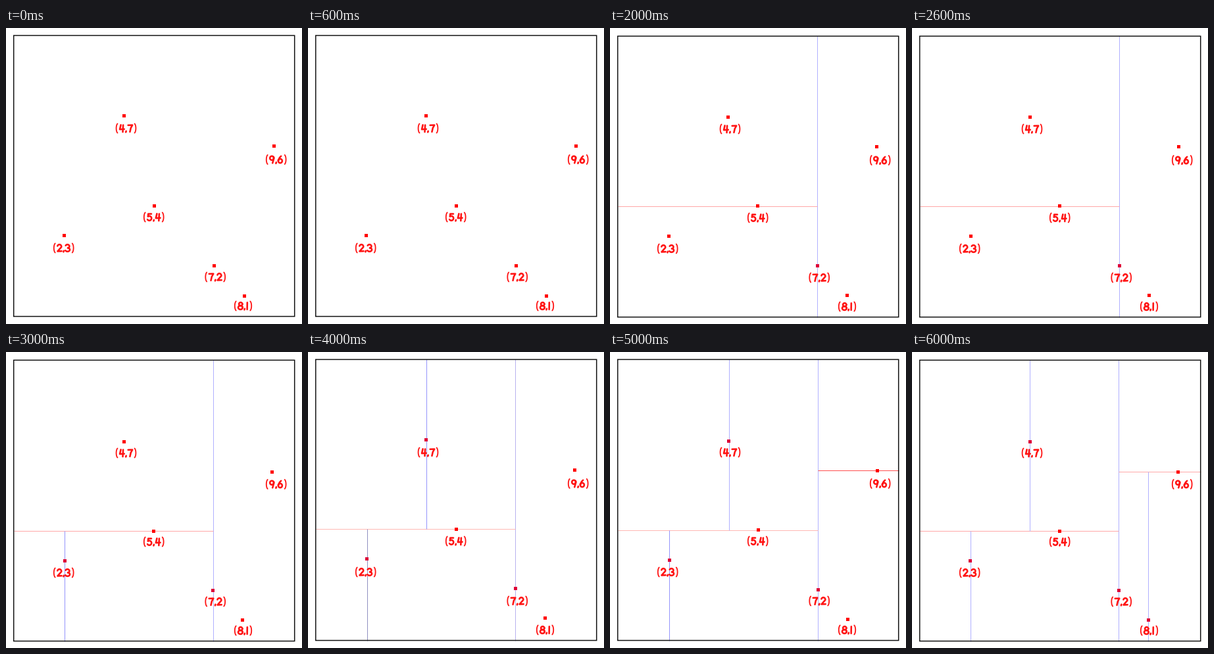
A matplotlib script that plays this animation: 450 px wide and 450 px high, repeating every 7 s.

```python
import numpy as np
import matplotlib.pyplot as plt
from matplotlib.animation import FuncAnimation
from matplotlib.patches import Rectangle

SIZE, DPI = 450, 100
PX = 72 / DPI
INK = "#ff1414"
BLUE, LILAC, DEEP_BLUE, SLATE = "#b0b0ff", "#b8b2ee", "#9494fc", "#9090c0"
PINK, PALE_PINK, RED = "#ffa8a8", "#ffb8b4", "#ff5050"

fig = plt.figure(figsize=(SIZE / DPI, SIZE / DPI), dpi=DPI, facecolor="white")
ax = fig.add_axes([0, 0, 1, 1])


def arc(cx, cy, rx, ry, start, end):
    """Points on an ellipse; angles in degrees, clockwise on screen."""
    t = np.radians(np.linspace(start, end, 24))
    return list(zip(cx + rx * np.cos(t), cy + ry * np.sin(t)))


# Handwritten strokes, y pointing down, centred on the text's middle line.
GLYPHS = {
    "(": [arc(3.6, 0, 2.8, 7.4, 252, 108)],
    ")": [arc(0.8, 0, 2.8, 7.4, -72, 72)],
    ",": [[(1.5, 4.2), (1, 5.9)]],
    "1": [[(2.2, -5.2), (2, 5.4)]],
    "2": [arc(4.2, -2.2, 3, 3.1, 195, 375) + [(1.4, 5), (7.6, 4.7)]],
    "3": [arc(3.8, -2.6, 3, 2.7, 205, 440) + arc(3.9, 2.5, 3.5, 2.8, -80, 155)],
    "4": [[(2.8, -5.2), (1.2, 1.6), (8, 1.2)], [(6.3, -5), (5.7, 5.6)]],
    "5": [[(7, -4.9), (2.2, -4.9), (1.8, -0.8)] + arc(3.9, 1.8, 3.3, 3.4, 235, 510)],
    "6": [[(5.6, -5.2), (3.4, -3), (1.4, 1)] + arc(4.3, 2.1, 3, 3.1, 190, 550)],
    "7": [[(1.2, -4.7), (7.8, -4.9), (5.4, -0.6), (4, 5.4)]],
    "8": [arc(4.7, -2.8, 2.6, 2.5, 0, 360), arc(4.4, 2.5, 3.4, 2.9, 0, 360)],
    "9": [arc(4.2, -2.2, 3, 3, -20, 340) + [(6.8, 0), (5.2, 5.4)]],
}
ADVANCE = {"(": 5, ",": 3.2, "1": 5}

# Grid point -> left edge and middle of its label.
LABELS = {
    (4, 7): (166.8, 152.5), (9, 6): (395, 200), (5, 4): (209, 287.5),
    (2, 3): (72, 334.5), (7, 2): (302.5, 378.5), (8, 1): (347, 422.5),
}

# Each split: point, direction, span in grid units (None is the border).
SPLITS = [
    ((7, 2), "v", None, None), ((5, 4), "h", None, 7),
    ((2, 3), "v", 4, None), ((4, 7), "v", None, 4),
    ((9, 6), "h", 7, None), ((8, 1), "v", 6, None),
]

# Each view: x and y of point (4, 7), grid pitch, border shift, line colours.
VIEWS = [
    (179.7, 133.4, 45.6, 0, []),
    (179.8, 134.6, 45.2, 0, [LILAC]),
    (179.5, 135.3, 45.2, 1, [BLUE, PINK]),
    (179.4, 136.9, 45.1, 1, [BLUE, PINK, DEEP_BLUE]),
    (179.9, 133.9, 45.15, 0, [LILAC, PALE_PINK, SLATE, DEEP_BLUE]),
    (180.5, 135.2, 45.2, 0, [BLUE, PALE_PINK, DEEP_BLUE, BLUE, RED]),
    (179.0, 136.9, 45.1, 1, [BLUE, PINK, BLUE, BLUE, PINK, BLUE]),
]


def write(text, x, y):
    for char in text:
        width = 1.8 if char in "()" else 2.6
        for stroke in GLYPHS[char]:
            sx, sy = np.transpose(stroke)
            ax.plot(x + sx, y + sy, color=INK, lw=width * PX, zorder=5,
                    solid_capstyle="round", solid_joinstyle="round")
        x += ADVANCE.get(char, 9.4)


def draw(step):
    ax.cla()
    ax.set(xlim=(0, SIZE), ylim=(SIZE, 0))
    ax.axis("off")
    x4, y7, pitch, shift, colors = VIEWS[step]
    left, right = 11.7, 438.7
    top, bottom = 11.4 + shift, 438.5 + shift

    def place(gx, gy):
        return x4 + pitch * (gx - 4), y7 + pitch * (7 - gy)

    upright = set()
    for (point, way, start, end), color in zip(SPLITS, colors):
        x, y = place(*point)
        if way == "v":
            upright.add(point)
            a = top if start is None else place(0, start)[1]
            b = bottom if end is None else place(0, end)[1]
            xs, ys = (x, x), (a, b)
        else:
            a = left if start is None else place(start, 0)[0]
            b = right if end is None else place(end, 0)[0]
            xs, ys = (a, b), (y, y)
        ax.plot(xs, ys, color=color, lw=PX, solid_capstyle="butt", zorder=2)

    ax.add_patch(Rectangle((left, top), right - left, bottom - top, fill=False,
                           ec="#101010", lw=1.5 * PX, zorder=3, snap=False))

    for point, (lx, ly) in LABELS.items():
        x, y = place(*point)
        color = "#de0038" if point in upright else "#ff0000"
        ax.add_patch(Rectangle((x - 2.5, y - 2.5), 5, 5, color=color, lw=0, zorder=4))
        write("({},{})".format(*point), lx, ly + shift)
    return ax.get_children()


anim = FuncAnimation(fig, draw, frames=len(VIEWS), init_func=lambda: [],
                     interval=1000, repeat=True, repeat_delay=0)
plt.show()
```
